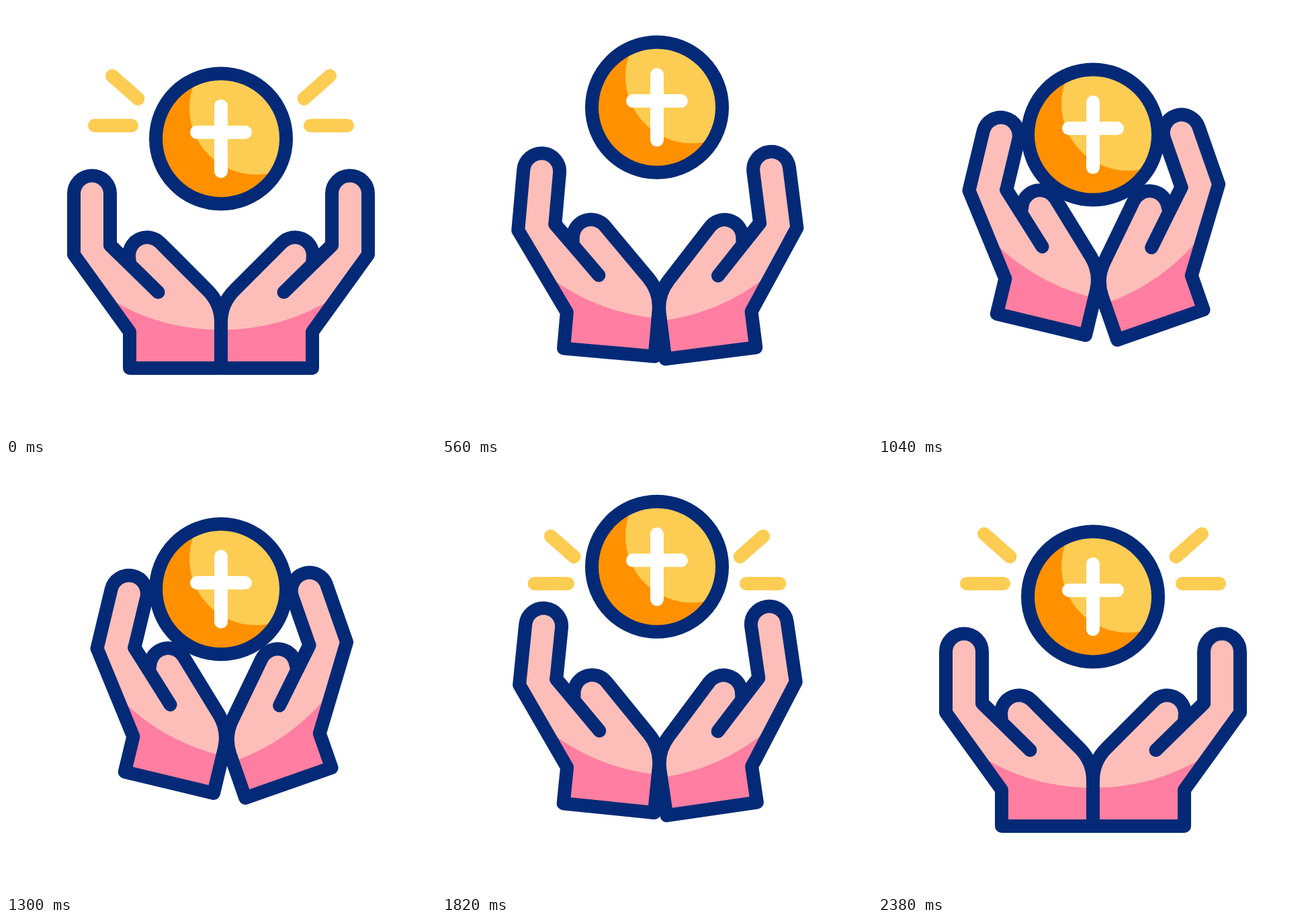
An HTML page that plays this animation: 640 px wide and 640 px high, repeating every 2.4 s.

```html
<!DOCTYPE html>
<html lang="en">
<head>
<meta charset="utf-8">
<title>Hands and coin</title>
<style>
  html, body { margin: 0; width: 100%; height: 100%; overflow: hidden; background: #fff; }
  svg { display: block; width: 100%; height: 100%; }
  .line { fill: none; stroke: #042a77; stroke-width: 20; stroke-linecap: round; stroke-linejoin: round; }
  .rays { fill: none; stroke: #fdcc52; stroke-width: 20; stroke-linecap: round; }
</style>
</head>
<body>
<svg viewBox="0 0 640 640">
  <defs>
    <path id="outline" d="M184 539V485L101 370V279.5A27 27 0 0 1 155 279.5V356L184 384L183 371A27 27 0 0 1 229 352L300 423C313 436 320 453 320 471V539Z"/>
    <g id="hand">
      <use href="#outline" fill="#fdbeb9"/>
      <path d="M152 434.4A320 320 0 0 0 320 482V539H184V485Z" fill="#ff7ea1"/>
      <use href="#outline" class="line"/>
      <path class="line" d="M155 356L226.500 426"/>
    </g>
    <clipPath id="disc"><circle cx="320" cy="197.500" r="97"/></clipPath>
  </defs>
  <g id="coin">
    <circle cx="320" cy="197.500" r="97" fill="#ff9100"/>
    <circle cx="372" cy="152" r="99" fill="#fdcc52" clip-path="url(#disc)"/>
    <circle class="line" cx="320" cy="197.500" r="97"/>
    <path d="M320 149V246M284 188H356" stroke="#fff" stroke-width="20" stroke-linecap="round"/>
  </g>
  <g id="left"><use href="#hand"/></g>
  <g id="right"><use href="#hand" transform="translate(640) scale(-1 1)"/></g>
  <path id="rays" class="rays"/>
</svg>
<script>
const LOOP = 2400;
const [coin, left, right, rays] = ['coin', 'left', 'right', 'rays'].map(id => document.getElementById(id));

// Inner end and direction of each ray on the left side
const RAYS = [[196.500, 138, -38.500, -34], [187, 178, -55, 0]];

const ramp = (t, from, to) => Math.min(1, Math.max(0, (t - from) / (to - from)));
const smooth = u => u * u * (3 - 2 * u);
const easeInOut = u => u < 0.5 ? 0.5 * (2 * u) ** 4.3 : 1 - 0.5 * (2 - 2 * u) ** 4.3;
// Leaves at the given speed and settles at rest
const settle = (u, speed) => speed * u * (1 - u) ** 2 + smooth(u);

function coinLift(t) {
  const leg = Math.floor(t / 600);
  const u = settle(t / 600 - leg, leg === 1 ? 0.92 : 1.4);
  return 47 * (leg % 2 ? 1 - u : u);
}

function poseHand(hand, fold, dx, angle, pivot) {
  hand.setAttribute('transform',
    `translate(${dx * fold} ${-72 * fold}) rotate(${angle * fold} ${pivot} 396)`);
}

function rayPath(length) {
  if (length <= 0.001) return '';
  return RAYS.map(([x, y, dx, dy]) => {
    const endX = x + dx * length, endY = y + dy * length;
    return `M${x} ${y}L${endX} ${endY}M${640 - x} ${y}L${640 - endX} ${endY}`;
  }).join('');
}

function draw(now) {
  const t = now % LOOP;
  const fold = easeInOut(1 - Math.abs(t / 1200 - 1));
  coin.setAttribute('transform', `translate(0 ${-coinLift(t)})`);
  poseHand(left, fold, 25.6, 13.5, 205);
  poseHand(right, fold, -17.5, -19.3, 435);
  rays.setAttribute('d', rayPath(t < 1200 ? 1 - smooth(ramp(t, 0, 400)) : smooth(ramp(t, 1500, 1900))));
}

const start = performance.now();
function tick() {
  draw(performance.now() - start);
  requestAnimationFrame(tick);
}
tick();
</script>
</body>
</html>
```
